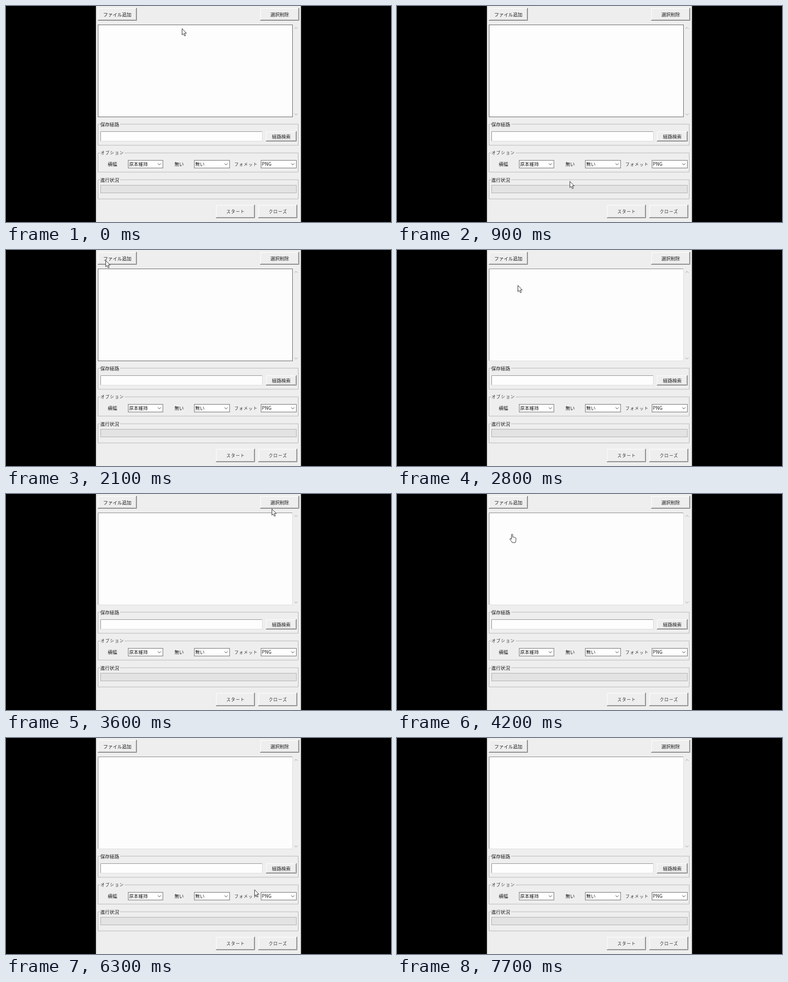
An HTML page that plays this animation: 600x338 px, repeating every 8000 ms.

```html
<!DOCTYPE html>
<html lang="ja">
<head>
<meta charset="utf-8">
<title>変換ツール</title>
<style>
  html, body { margin: 0; width: 100%; height: 100%; overflow: hidden; background: #000; }
  svg { display: block; width: 600px; height: 338px; }
  text { font: 7.3px "Noto Sans CJK JP", "Noto Sans CJK", "Noto Sans", sans-serif; fill: #1c1c1c; }
  .kana { font-size: 6.3px; letter-spacing: 1px; fill: #2a2a2a; }
  .line { fill: none; stroke-width: 1; }
  .cursor { fill: #fff; stroke: #444; stroke-width: .9; stroke-linejoin: round; }
</style>
</head>
<body>
<svg viewBox="0 0 600 338">
  <rect width="600" height="338" fill="#000"/>
  <rect x="140.2" width="319.5" height="338" fill="#eee"/>
  <g id="panel"></g>
  <path id="arrow" class="cursor" d="M.4.4V10.2L2.6 8.2 4.2 11.9 5.8 11.2 4.2 7.6H7.2Z"/>
  <path id="hand" class="cursor" d="M3.4 8.6V1.9Q3.4.8 4.4.8T5.4 1.9V5.6Q6.4 4.8 7.2 5.9 8.2 5.2 8.8 6.3 10.3 6 10.3 7.5V10.4Q10.3 12 9.2 14H4.6Q3.8 12.2 1 9.1.6 7.6 1.9 7.5Z"/>
</svg>
<script>
const LOOP = 8000, STEP = 100;
const FOCUS_END = 2300;
const $ = id => document.getElementById(id);
const panel = $("panel");

function add(tag, attrs, content = "") {
  const el = document.createElementNS("http://www.w3.org/2000/svg", tag);
  for (const key in attrs) el.setAttribute(key, attrs[key]);
  el.textContent = content;
  return panel.appendChild(el);
}
const line = (d, stroke) => add("path", { d, stroke, class: "line" });
const box = (x, y, w, h, fill, stroke) =>
  add("rect", { x: x + .5, y: y + .5, width: w - 1, height: h - 1, fill, stroke });

function label(text, x, y, anchor = "start") {
  const kana = /^[ァ-ー]+$/.test(text);
  add("text", {
    x: kana ? x + .5 : x, y: y + (kana ? 2.5 : 2.7),
    "text-anchor": anchor, class: kana ? "kana" : ""
  }, text);
}

// Two-tone edge: one colour along the top left, another along the bottom right.
function bevel(x, y, w, h, light, dark) {
  line(`M${x + .5} ${y + h - 1}V${y + .5}H${x + w - 1}`, light);
  line(`M${x} ${y + h - .5}H${x + w - .5}V${y}`, dark);
}

function button(text, x, y, w, h) {
  bevel(x, y, w, h, "#f8f8f8", "#808080");
  bevel(x + 1, y + 1, w - 2, h - 2, "#f2f2f2", "#c4c4c4");
  label(text, x + w / 2, y + h / 2, "middle");
}

function field(x, y, w, h, edge) {
  add("rect", { x, y, width: w, height: h, fill: "#fdfdfd" });
  bevel(x, y, w, h, edge, "#e2e2e2");
}

function group(text, y, h, textWidth) {
  for (const [shift, color] of [[1, "#f6f6f6"], [0, "#bdbdbd"]]) {
    const top = y + .5 + shift, left = 143.5 + shift;
    line(`M147 ${top}H${left}V${top + h}H${455.5 + shift}V${top}H${148 + textWidth}`, color);
  }
  label(text, 147, y + .3);
}

function chevron(x, y, dir, color) {
  line(`M${x - 2.4} ${y - dir * 1.2}L${x} ${y + dir * 1.2}L${x + 2.4} ${y - dir * 1.2}`, color);
}

function combo(text, x, w) {
  box(x, 241, w, 13, "#fff", "#8e8e8e");
  label(text, x + 1.8, 247.5);
  chevron(x + w - 6, 247.5, 1, "#606060");
}

button("ファイル追加", 143, 3, 61, 20);
button("選択削除", 396, 3, 61, 20);

field(143, 29, 304, 145, "#a0a0a0");
const focus = box(143, 29, 304, 145, "none", "#868686");
chevron(452, 34.5, -1, "#b0b0b0");
chevron(452, 169.5, 1, "#b0b0b0");

group("保存経路", 184.5, 33, 30);
field(147, 196, 253, 16, "#a8a8a8");
button("経路検索", 405, 196, 48, 16);

group("オプション", 229.5, 30, 37);
label("横幅", 158.5, 247.5);
combo("原本維持", 190, 55);
label("無い", 262.5, 247.5);
combo("無い", 293, 56);
label("フォメット", 355.5, 247.5);
combo("PNG", 397, 56);

group("進行状況", 271.5, 30, 30);
box(147, 280, 306, 13, "#e3e3e3", "#bdbdbd");

button("スタート", 327, 311, 61, 21);
button("クローズ", 393, 311, 61, 21);

// The pointer glides through each move's points, then rests on the last one.
const moves = [];
let rest = [274, 35];
function glide(from, to, ...points) {
  moves.push({ from, to, points: [rest, ...points] });
  rest = points.at(-1);
}

// Add button, progress bar, start and close, path search, options
glide(0, 300, [313, 176], [149, 10]);
glide(600, 900, [269, 274]);
glide(900, 1300, [434, 322], [422, 202]);
glide(1400, 1700, [355, 262], [175, 139]);
// Add button again, round trips over the window, file list
glide(1800, 2100, [155, 16]);
glide(2100, 2800, [380, 311], [188, 55]);
glide(2800, 3400, [151, 13], [430, 173], [390, 40]);
glide(3500, 4200, [432, 11], [310, 311], [140, 160], [175, 62]);
glide(4400, 4500, [204, 76]);
// Back from the close button to the format list
glide(5900, 6300, [427, 311], [387, 237]);
glide(6400, 6600, [342, 218]);
glide(6800, 7100, [422, 202], [417, 235]);

const between = (t, from, to) => t >= from && t < to;
const hidden = t => between(t, 4600, 6000) || t >= 7700;

function position(t) {
  const { from, to, points } = moves.findLast(move => move.from <= t);
  const legs = points.length - 1;
  const u = Math.min((t - from) / (to - from), 1) * legs;
  const i = Math.min(Math.floor(u), legs - 1);
  return points[i].map((v, axis) => Math.round(v + (points[i + 1][axis] - v) * (u - i)));
}

const show = (el, on) => el.setAttribute("visibility", on ? "visible" : "hidden");

function draw(now) {
  const t = Math.floor(now % LOOP / STEP) * STEP;
  const kind = between(t, 4200, 4600) ? "hand" : "arrow";
  for (const id of ["arrow", "hand"]) {
    show($(id), id === kind && !hidden(t));
    $(id).setAttribute("transform", `translate(${position(t)})`);
  }
  show(focus, t < FOCUS_END);
}

const start = performance.now();
function tick() {
  draw(performance.now() - start);
  requestAnimationFrame(tick);
}
tick();
</script>
</body>
</html>
```
